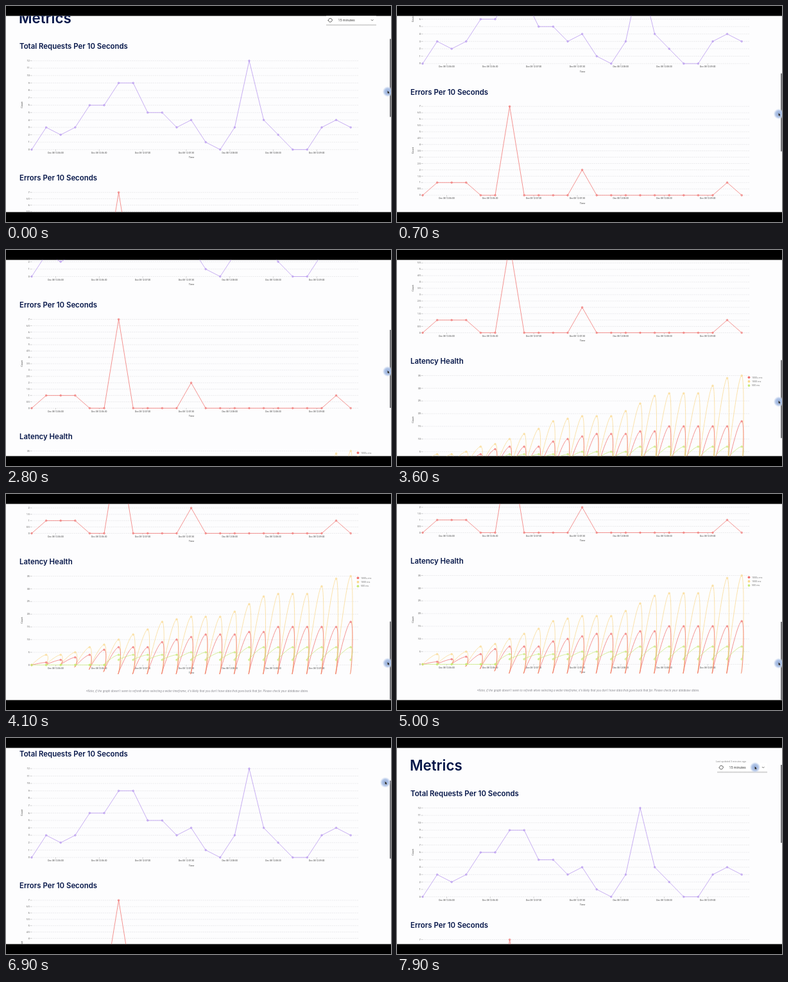
Recreate the animation shown at these times as an HTML page. Size 600 px wide and 338 px high, loop 8000 ms.

```html
<!DOCTYPE html>
<html lang="en">
<head>
<meta charset="utf-8">
<title>Metrics</title>
<style>
  html, body { margin: 0; width: 100%; height: 100%; overflow: hidden; background: #000; }
  svg { display: block; width: 100vw; height: 100vh; }
  text { font-family: Roboto, "Open Sans", sans-serif; font-size: 3.4px; fill: #444; }
  .title, .heading { font-family: Inter, Roboto, sans-serif; font-weight: 600; fill: #041548; }
  .title { font-size: 22.3px; }
  .heading { font-size: 11.4px; }
  .axis { font-size: 3.9px; }
  .grid { stroke: #dfdfe3; stroke-width: .6; stroke-dasharray: 2 1; }
  .tick { stroke: #999; stroke-width: .5; }
  .line { fill: none; stroke-width: .75; stroke-linejoin: round; }
  .note { font-family: Inter, Roboto, sans-serif; font-size: 4.25px; font-style: italic; fill: #85858c; }
</style>
</head>
<body>
<svg viewBox="0 0 600 338">
  <defs>
    <clipPath id="view"><rect y="15.6" width="600" height="307"/></clipPath>
    <radialGradient id="halo">
      <stop offset="0" stop-color="#8fa9d8"/>
      <stop offset=".65" stop-color="#b4c7e8"/>
      <stop offset="1" stop-color="#cfdcf2" stop-opacity=".2"/>
    </radialGradient>
    <linearGradient id="shadow" x2="0" y2="1">
      <stop offset="0" stop-color="#bbb"/>
      <stop offset="1" stop-color="#bbb" stop-opacity="0"/>
    </linearGradient>
  </defs>
  <rect width="600" height="338"/>
  <g clip-path="url(#view)">
    <rect width="600" height="338" fill="#fdfdfe"/>
    <g id="page"></g>
    <rect id="thumb" x="598" width="2" height="122" fill="#77777b"/>
    <g id="cursor">
      <circle r="8" fill="url(#halo)"/>
      <path d="M-.5-1.7V3.2L.7 2.2 1.5 3.8 2.3 3.4 1.6 1.9 3 1.7Z" fill="#111" stroke="#fff" stroke-width=".25"/>
    </g>
  </g>
</svg>
<script>
const LOOP = 8000, STEP = 100;
const LEFT = 40, RIGHT = 549, GAP = 22.6, HEIGHT = 139, COUNT = 23;
const PURPLE = '#b493ee', RED = '#f0706e', AMBER = '#fad98f', GREEN = '#c9ea78';
const page = document.getElementById('page');
const thumb = document.getElementById('thumb');
const cursor = document.getElementById('cursor');

function add(tag, attrs, content) {
  const el = document.createElementNS('http://www.w3.org/2000/svg', tag);
  for (const key in attrs) el.setAttribute(key, attrs[key]);
  if (content !== undefined) el.textContent = content;
  page.append(el);
}

const label = (x, y, content, attrs) => add('text', { x, y, ...attrs }, content);
const middle = { 'text-anchor': 'middle' };
const pointX = i => LEFT + i * GAP;
const series = rule => Array.from({ length: COUNT }, (_, i) => rule(i));

// Whole-number samples along straight runs between [index, value] corners.
const runs = (...corners) => series(i => {
  const n = Math.max(1, corners.findIndex(([index]) => index >= i));
  const [i0, v0] = corners[n - 1], [i1, v1] = corners[n];
  return Math.floor(v0 + (v1 - v0) * (i - i0) / (i1 - i0));
});

function axes(heading, zero, max, step) {
  const toY = value => zero - value * HEIGHT / max;
  label(21, zero - 157.5, heading, { class: 'heading' });
  for (let v = 0; v <= max; v += step) {
    const y = toY(v);
    add('line', { x1: LEFT, x2: RIGHT, y1: y, y2: y, class: 'grid' });
    add('line', { x1: 37.8, x2: LEFT, y1: y, y2: y, class: 'tick' });
    label(36.6, y + 1.2, v, { 'text-anchor': 'end' });
  }
  for (let i = 0; i < 7; i++) {
    const x = pointX(i * 3) + 37.5;
    const time = `12:0${6 + (i >> 1)}:${i % 2 ? '30' : '00'}`;
    add('line', { x1: x, x2: x, y1: zero, y2: zero + 2, class: 'tick' });
    label(x, zero + 6.2, `Dec 08 ${time}`, middle);
  }
  const cy = zero - 70;
  label(289, zero + 13.8, 'Time', { ...middle, class: 'axis' });
  label(25.6, cy, 'Count', { ...middle, class: 'axis', transform: `rotate(-90 25.6 ${cy})` });
  return toY;
}

const stroke = (d, color) => add('path', { d, class: 'line', stroke: color });

function dots(values, toY, color) {
  values.forEach((v, i) => add('circle', {
    cx: pointX(i), cy: toY(v), r: 1.3, fill: color, 'fill-opacity': .4, stroke: color, 'stroke-width': .7
  }));
}

function lineChart(values, toY, color) {
  stroke('M' + values.map((v, i) => `${pointX(i)} ${toY(v)}`).join('L'), color);
  dots(values, toY, color);
}

// Each sample rises in an arc, then drops sharply to its floor before the next one.
function archChart(values, toY, color, floor) {
  let x0 = LEFT, y0 = toY(0), d = `M${x0} ${y0}`;
  for (let i = 1; i < COUNT; i++) {
    const x = pointX(i), top = toY(values[i]), bottom = toY(floor(i));
    d += `C${x0 + 4.5} ${y0 + (top - y0) * .3} ${x - 5.5} ${top} ${x} ${top}`;
    d += `S${x + 2} ${bottom - 2} ${x - 1} ${bottom}`;
    x0 = x - 1;
    y0 = bottom;
  }
  stroke(d, color);
  dots(values, toY, color);
}

function toolbar() {
  label(497, 37.6, 'Last updated 3 minutes ago', { style: 'font-size:3.8px;fill:#888' });
  add('rect', { x: 499, y: 39, width: 78, height: 14, fill: '#fff' });
  add('rect', { x: 499, y: 52.7, width: 78, height: 2.5, fill: 'url(#shadow)' });
  add('path', { d: 'M502.6 45.3a2.9 2.9 0 0 1 5.5-.3M508 46.8a2.9 2.9 0 0 1-5.5.3', fill: 'none', stroke: '#555', 'stroke-width': .9 });
  add('path', { d: 'M507 45.2h2.5l-1.1 1.5zM503.6 46.7h-2.5l1.1-1.5z', fill: '#555' });
  label(517.5, 47.8, '15 minutes', { style: 'font-size:5.3px' });
  add('path', { d: 'M569 45.1l1.7 1.7 1.7-1.7', fill: 'none', stroke: '#555', 'stroke-width': .9 });
}

function latencyChart() {
  const toY = axes('Latency Health', 660.5, 35, 5);
  const dip = i => -Math.min(3.6, Math.max(0, (i - 2) * .9));
  const amber = runs([0, 0], [1, 4], [2, 4], [6, 10], [9, 17], [11, 19], [13, 19], [16, 27], [17, 28], [19, 28], [21, 34], [22, 35]);
  const red = runs([0, 0], [6, 7.3], [8, 7], [9, 9], [12, 12], [13, 12], [16, 13.9], [17, 15], [21, 15], [22, 17]);
  const green = series(i => i < 6 ? 0 : i < 15 ? 4 + (i > 10) : 7);
  const low = i => i < 6 ? 0 : 2;
  archChart(amber, toY, AMBER, dip);
  archChart(red, toY, RED, dip);
  archChart(green, toY, GREEN, low);
  dots(series(low), toY, GREEN);
  [['1000+ ms', RED], ['1000 ms', AMBER], ['500 ms', GREEN]].forEach(([name, color], i) => {
    const y = 524.3 + i * 6.4;
    add('circle', { cx: 548.5, cy: y, r: 1.9, fill: color });
    label(553, y + 1.3, name, { style: 'font-size:3.7px;fill:#777' });
  });
}

function buildPage() {
  label(20, 51, 'Metrics', { class: 'title' });
  toolbar();
  const requests = [0, 3, 2, 3, 6, 6, 9, 9, 5, 5, 3, 4, 1, 0, 3, 12, 4, 2, 0, 0, 3, 4, 3];
  lineChart(requests, axes('Total Requests Per 10 Seconds', 248.5, 12, 1), PURPLE);
  const errors = runs([0, 0], [1, 1], [3, 1], [4, 0], [5, 0], [6, 7], [7, 0], [10, 0], [11, 2], [12, 0], [20, 0], [21, 1], [22, 0]);
  lineChart(errors, axes('Errors Per 10 Seconds', 454.5, 7, .5), RED);
  latencyChart();
  label(298, 703.3, "*Note, if the graph doesn't seem to refresh when selecting a wider timeframe, it's likely that you don't have data that goes back that far. Please check your database dates.",
    { ...middle, class: 'note' });
}

// Adds up eased moves, each given as [start, end, distance].
const travel = (t, from, ...moves) => moves.reduce((sum, [start, end, distance]) => {
  const p = Math.min(1, Math.max(0, (t - start) / (end - start)));
  return sum + distance * p * p * (3 - 2 * p);
}, from);

function render(now) {
  const t = Math.floor(now % LOOP / STEP) * STEP;
  const scroll = travel(t, 0, [-312, 1165, 207], [2800, 4160, 187], [6150, 7150, -394]);
  const x = travel(t, 595, [6700, 7700, -37]);
  const y = travel(t, 134, [0, 1200, 56], [2800, 4160, 75], [6000, 7130, -219]);
  page.setAttribute('transform', `translate(0 ${-scroll})`);
  thumb.setAttribute('y', 42 + scroll * .401);
  cursor.setAttribute('transform', `translate(${x} ${y})`);
}

buildPage();
const start = performance.now();
function tick() {
  render(performance.now() - start);
  requestAnimationFrame(tick);
}
tick();
</script>
</body>
</html>
```
